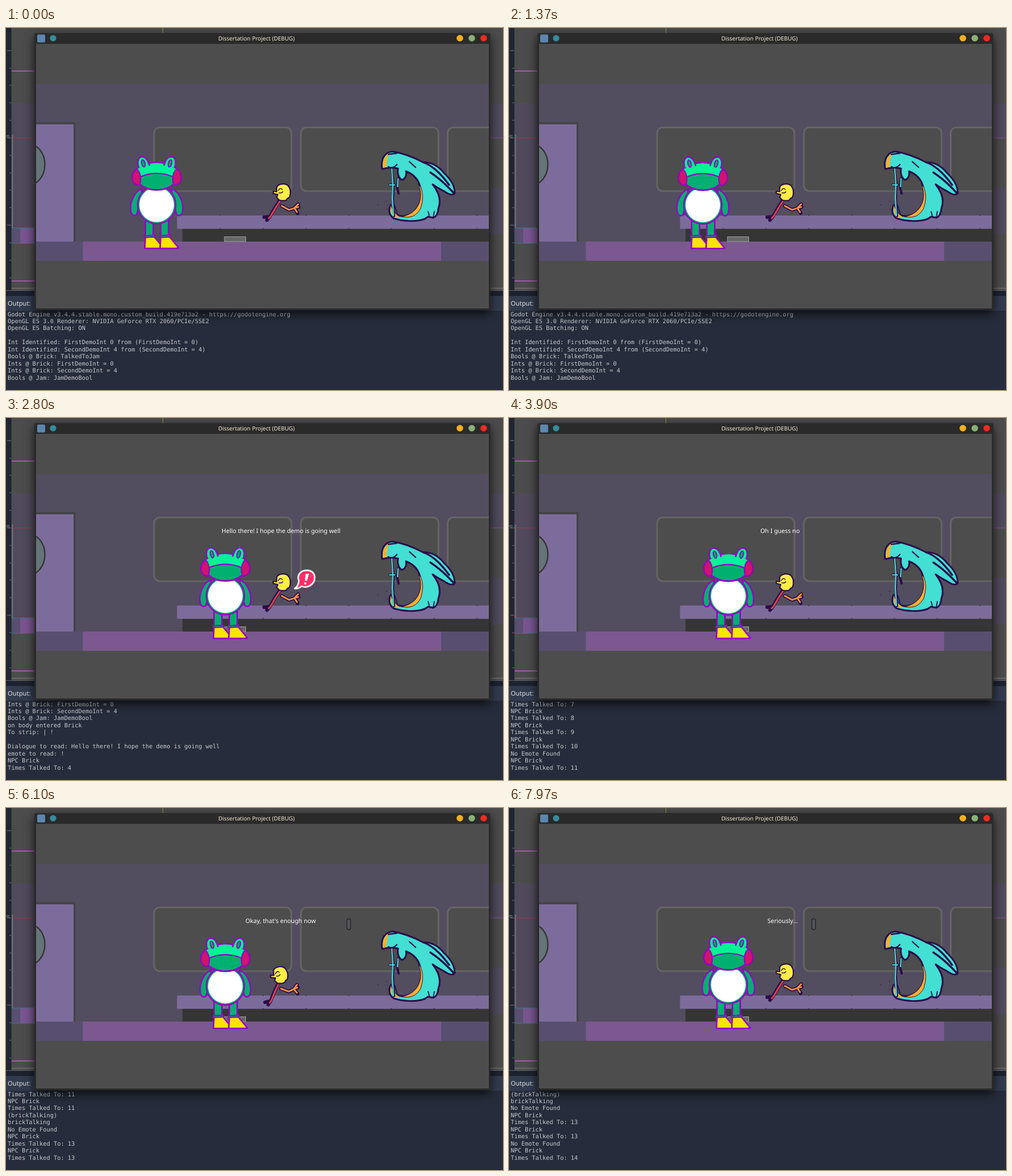
An HTML page that plays this animation: 876x639 px, repeating every 8 s.

```html
<!DOCTYPE html>
<html lang="en">
<head>
<meta charset="utf-8">
<title>Dialogue demo</title>
<style>
  html, body { margin: 0; width: 100%; height: 100%; overflow: hidden; background: #262c3b; }
  svg { display: block; }
  text { white-space: pre; font-family: "Noto Sans", sans-serif; text-rendering: geometricPrecision; }
  #log text { font: 10.35px "DejaVu Sans Mono", monospace; fill: #c9cbd0; }
  #frame { filter: drop-shadow(0 6px 9px rgba(0,0,0,.75)); }
  #frog { stroke: #9800c4; stroke-width: 2.6; stroke-linejoin: round; stroke-linecap: round; }
  .ink { stroke: #2b0d4a; stroke-linejoin: round; stroke-linecap: round; }
  .line { fill: none; }
</style>
</head>
<body>
<svg width="876" height="639" viewBox="0 0 876 639">
  <defs>
    <g id="leg">
      <rect x="246" y="336" width="14" height="32" fill="#00b070"/>
      <path d="M246 369H262L278 388.5Q270 389.5 245 389Z" fill="#ffe400"/>
      <path d="M244 367L263 365.5V368.5L244 370Z" fill="#00b070" stroke-width="2"/>
    </g>
  </defs>

  <!-- editor behind the window -->
  <rect width="876" height="464" fill="#4c4c4c"/>
  <rect y="133" width="876" height="231" fill="#504a5c"/>
  <rect x="853" y="194" width="23" height="87" fill="#4c4c4c"/>
  <g fill="none">
    <path d="M10 76H50M10 446.5H50" stroke="#c35fd0" stroke-width="1.6"/>
    <path d="M10 194H50" stroke="#a8354a"/>
    <path d="M853 194H876" stroke="#8b5397"/>
    <path d="M276.5 0V9" stroke="#82a52b"/>
    <path d="M10 459.5H876" stroke="#6a6a6a" stroke-width="2"/>
    <path d="M11.2 188V353" stroke="#716a76" stroke-width="2.4"/>
  </g>
  <rect x="10" y="353" width="40" height="27" fill="#594f70"/>
  <rect x="25" y="353" width="25" height="27" fill="#795590"/>
  <path d="M10 353H50M10 380H50" stroke="#3c7d86"/>
  <rect width="9.5" height="464" fill="#202531"/>
  <path d="M2 40H9M6 71H9M6 101H9M6 132H9M6 163H9M2 194H9M6 225H9M6 256H9M6 286H9M6 317H9M2 348H9M6 379H9M6 410H9M6 441H9" stroke="#777d88"/>
  <text font-size="7.5" fill="#a0a4ae" transform="translate(6 193) rotate(-90)">0</text>

  <!-- output panel -->
  <rect y="463" width="876" height="176" fill="#1d2230"/>
  <path d="M0 463.5H876" stroke="#5c6069"/>
  <rect y="473" width="876" height="26" fill="#323b4e"/>
  <rect y="499" width="876" height="140" fill="#262c3b"/>
  <text x="3" y="490" font-size="11.2" fill="#dfe1e5">Output:</text>
  <g id="log"></g>

  <!-- game window -->
  <rect id="frame" x="50" y="9" width="803.5" height="489" rx="3" fill="#2a2a2a"/>
  <text x="441.5" y="21.7" font-size="10" text-anchor="middle" fill="#f3ead2">Dissertation Project (DEBUG)</text>
  <rect x="55" y="11.5" width="14" height="14" rx="2" fill="#5d86ae"/>
  <circle cx="83" cy="18" r="5.6" fill="#358c9b"/>
  <circle cx="800" cy="18" r="5.8" fill="#f6ae20"/>
  <circle cx="821" cy="18" r="5.8" fill="#8ab178"/>
  <circle cx="842" cy="18" r="5.8" fill="#ec2b22"/>

  <svg x="53" y="28" width="798" height="467" viewBox="53 28 798 467">
    <rect x="53" y="28" width="798" height="467" fill="#4d4d4d"/>
    <rect x="53" y="98.5" width="798" height="312.5" fill="#534d60"/>
    <rect x="53" y="166" width="69.5" height="211" fill="#454449"/>
    <rect x="53" y="170" width="66" height="207" fill="#7c6c9b"/>
    <ellipse cx="40" cy="241" rx="28.5" ry="36" fill="#657478" stroke="#343434" stroke-width="2.4"/>
    <g fill="#4d4d4d" stroke="#656565" stroke-width="3">
      <rect x="261" y="175.5" width="242" height="112.5" rx="10"/>
      <rect x="519.7" y="175.5" width="242.6" height="112.5" rx="10"/>
      <rect x="778.5" y="175.5" width="242" height="112.5" rx="10"/>
    </g>
    <rect x="311" y="353" width="540" height="24" fill="#353535"/>
    <rect x="301.5" y="331" width="549.5" height="23.5" fill="#7c6c9b"/>
    <path d="M377 331H851M377 354H851" stroke="#3d3844" stroke-width="2" stroke-dasharray="1.5 73.9"/>
    <rect x="53" y="377" width="798" height="34" fill="#584f70"/>
    <rect x="135.5" y="377" width="631.5" height="34" fill="#7b588f"/>
    <rect x="385" y="368.5" width="37.5" height="8.5" fill="#676767" stroke="#a0a0a0"/>

    <!-- long-eared creature -->
    <g class="ink" stroke-width="3">
      <path d="M663 249C660 231 667 219 682 218C700 221 718 228 735 237C748 236 762 243 772 256C784 267 791 278 791 291C788 297 779 293 772 288Q760 282 752 276C764 291 767 306 762 319Q761 332 753 335L744 333L738 337C722 343 699 341 683 336C674 329 674 321 678 312C680 325 687 332 700 332C722 330 735 309 731 286C729 270 721 259 705 253C707 261 702 268 697 268C690 262 690 254 691 248Q676 245 663 249Z" fill="#42dfd2"/>
      <path d="M665 247Q662 229 676 220Q670 233 671 245Z" fill="#ffb02c" stroke="none"/>
      <path d="M727 277C737 299 728 328 697 333Q721 338 731 318Q738 297 731 281Z" fill="#ffb02c" stroke-width="1"/>
      <path d="M678 313Q677 326 683 333L694 334Q682 326 678 313Z" fill="#ffb02c" stroke="none"/>
      <path class="line" d="M735 237Q757 244 781 277M748 255Q768 268 789 291" stroke-width="3.4"/>
      <path class="line" d="M674 223L689 221M711 236L722 246M674 245Q681 250 689 241" stroke-width="2.3"/>
      <path class="line" d="M746 331L744 324M753 334L755 324M685 313L690 329" stroke-width="1.8"/>
    </g>
    <g fill="none" stroke-linecap="round">
      <path d="M680 250L683 276L682 300L684 332M691 265L689 280L692 292M676 277H686" stroke="#2b0d4a" stroke-width="4"/>
      <path d="M680 249L682 276L681 300L683 331M691 266L690 280M676 277H685" stroke="#42dfd2" stroke-width="2.2"/>
      <path d="M655 312H656M671 320H672M670 306H671" stroke="#2b0d4a"/>
    </g>

    <!-- running chick -->
    <g id="chick" class="ink">
      <path class="line" d="M483 304L475 316L465 333M486 314L499 321L508 318L515 311M509 318L514 327M508 318L516 316M465 333L455 334M465 333L460 339" stroke-width="6.2"/>
      <path class="line" d="M484 304L476 316L466 333M463 336L466 333" stroke="#e5404e" stroke-width="2.8"/>
      <path class="line" d="M486 314L499 321L508 318L515 311M508 318L515 316M509 319L513 325" stroke="#ff943b" stroke-width="2.8"/>
      <path d="M477 283C477 275 491 273 497 278C502 284 502 292 500 298C498 301 495 300 495 303C490 307 485 304 482 304L477 299L479 294L471 292L471 288L477 289Z" fill="#ffee45" stroke-width="2.2"/>
      <path class="line" d="M480 287Q483 281 487 285M481 291Q486 292 488 289" stroke-width="1.5"/>
    </g>

    <!-- speech emote -->
    <g id="emote">
      <path d="M516 287C512 276 521 268 532 269C543 270 546 279 543 288C538 298 528 300 521 297Q515 302 509 301Q516 296 516 287Z" fill="#ff2e68" stroke="#f7f3f4" stroke-width="2.8" stroke-linejoin="round"/>
      <path d="M528.5 276L533.5 275L530 287L527.5 287Z" fill="#fff" stroke="#fff" stroke-linejoin="round"/>
      <circle cx="527.5" cy="292" r="2" fill="#fff"/>
    </g>

    <g id="frog">
      <g id="legL"><use href="#leg"/></g>
      <g id="legR"><use href="#leg" x="27"/></g>
      <g id="torso">
        <g id="arms" fill="#00b070">
          <path id="arm" d="M240 284C228 287 217 307 220.5 325C223 333 231 333 232 325L238 304Z"/>
          <use href="#arm" transform="matrix(-1 0 0 1 532 0)"/>
        </g>
        <ellipse cx="266" cy="312" rx="33.5" ry="33.5" fill="#00b070"/>
        <ellipse cx="266" cy="312" rx="30.5" ry="30.5" fill="#fff" stroke="none"/>
        <path d="M248 240C234 243 223 253 223 264C224 272 229 277 237 277Q249 286 266 286Q283 286 295 277C303 277 308 272 309 264C309 253 298 243 284 240Q266 234 248 240Z" fill="#00f394"/>
        <path d="M236 263Q266 250 296 263Q299 271 295 276Q283 285.5 266 285.5Q249 285.5 237 276Q233 271 236 263Z" fill="#00b070" stroke-width="2.2"/>
        <g id="side">
          <path d="M231 249C223 254 221 265 225 272C228 276 232 278 236 276C239 268 238 255 231 249Z" fill="#cf146f" stroke-width="2.2"/>
          <path d="M234 246C230 232 236 226 242 227.5C249 229 251 236 253 242" fill="#00f394"/>
          <ellipse cx="242.5" cy="239" rx="3" ry="6.5" fill="#00a565" stroke-width="1.8" transform="rotate(-14 242.5 239)"/>
        </g>
        <use href="#side" transform="matrix(-1 0 0 1 532 0)"/>
      </g>
    </g>

    <text id="speech" y="203" font-size="10.7" fill="#fff"></text>
    <rect id="prompt" x="-3.2" y="195.5" width="6.4" height="19" rx="3" fill="#55555c" stroke="#24242b" stroke-width="1.4"/>
  </svg>
</svg>
<script>
const $ = id => document.getElementById(id);
const LOOP = 8000;
const talk = n => ["NPC Brick", "Times Talked To: " + n];
const hello = "Hello there! I hope the demo is going well";

// [time, lines printed]
const prints = [
  [0, ["Godot Engine v3.4.4.stable.mono.custom_build.419e713a2 - https://godotengine.org",
    "OpenGL ES 3.0 Renderer: NVIDIA GeForce RTX 2060/PCIe/SSE2",
    "OpenGL ES Batching: ON", "",
    "Int Identified: FirstDemoInt 0 from (FirstDemoInt = 0)",
    "Int Identified: SecondDemoInt 4 from (SecondDemoInt = 4)",
    "Bools @ Brick: TalkedToJam", "Ints @ Brick: FirstDemoInt = 0",
    "Ints @ Brick: SecondDemoInt = 4", "Bools @ Jam: JamDemoBool"]],
  [1700, ["on body entered Brick"]],
  [2250, ["To strip: | !", "", "Dialogue to read: " + hello, "emote to read: !", ...talk(4)]],
  ...[5, 6, 7, 8, 9, 10].map((n, i) => [2950 + i * 110, talk(n)]),
  [3750, ["No Emote Found", ...talk(11)]],
  ...[3980, 4160, 4340, 4600].map(time => [time, talk(11)]),
  [5450, ["(brickTalking)", "brickTalking", "No Emote Found", ...talk(13)]],
  [5750, talk(13)],
  [7150, ["No Emote Found", ...talk(14)]]
];

// start, left edge, words, prompt time, prompt centre
const speeches = [
  [2250, 380, hello, Infinity, 0],
  [3750, 443, "Oh I guess not...", 4600, 574.5],
  [5450, 422, "Okay, that's enough now", 5800, 604],
  [7150, 455.5, "Seriously...", 7400, 537]
];

const rows = Array.from({ length: 10 }, (_, i) => {
  const row = document.createElementNS("http://www.w3.org/2000/svg", "text");
  row.setAttribute("x", 3);
  row.setAttribute("y", 508.5 + i * 12.45);
  return $("log").appendChild(row);
});

const move = (id, value) => $(id).setAttribute("transform", value);
const show = (id, on) => $(id).setAttribute("visibility", on ? "visible" : "hidden");
const clamp = (v, lo, hi) => Math.min(hi, Math.max(lo, v));
const setText = (node, value) => { if (node.textContent !== value) node.textContent = value; };

function drawFrog(t) {
  if (t > 900 && t < 1130) t = 900; // the game stalls here
  const start = 567, stop = 1813, turn = 2 * Math.PI;
  const walking = t > start && t < stop;
  const dx = clamp((t - start) * .06, 0, 8) + clamp((t - 700) * .1015, 0, 113);
  const swing = walking ? 13 * Math.sin(turn * (t - start) / 533) : 0;
  const bob = walking ? .4
    : t <= start ? 1.25 * (1 - Math.cos(turn * t / 1200))
    : 1.25 * (1 + Math.cos(turn * (t - 4970) / 1200));
  move("frog", `translate(${dx - .4})`);
  move("legL", `rotate(${swing} 253 338)`);
  move("legR", `rotate(${-swing * .7} 279 338)`);
  move("torso", `translate(0 ${bob})`);
  move("arms", `translate(266) scale(${1 - .015 * bob} 1) translate(-266)`);
}

function draw() {
  const t = performance.now() % LOOP;
  drawFrog(t);

  const hop = t > 5450 && t < 6800 ? Math.abs(Math.sin((t - 5450) / 450 * Math.PI)) : 0;
  move("chick", `translate(${-2 * hop} ${5 * hop}) rotate(${-8 * hop} 486 310)`);
  show("emote", t >= 2250 && t < 3400);

  const lines = prints.filter(p => p[0] <= t).flatMap(p => p[1]).slice(-10);
  rows.forEach((row, i) => setText(row, lines[i]));

  const said = speeches.filter(s => s[0] <= t).pop();
  show("prompt", said && t >= said[3]);
  setText($("speech"), said ? said[2].slice(0, Math.ceil((t - said[0]) / 12)) : "");
  if (said) {
    $("speech").setAttribute("x", said[1]);
    move("prompt", `translate(${said[4]})`);
  }
  requestAnimationFrame(draw);
}
draw();
</script>
</body>
</html>
```
